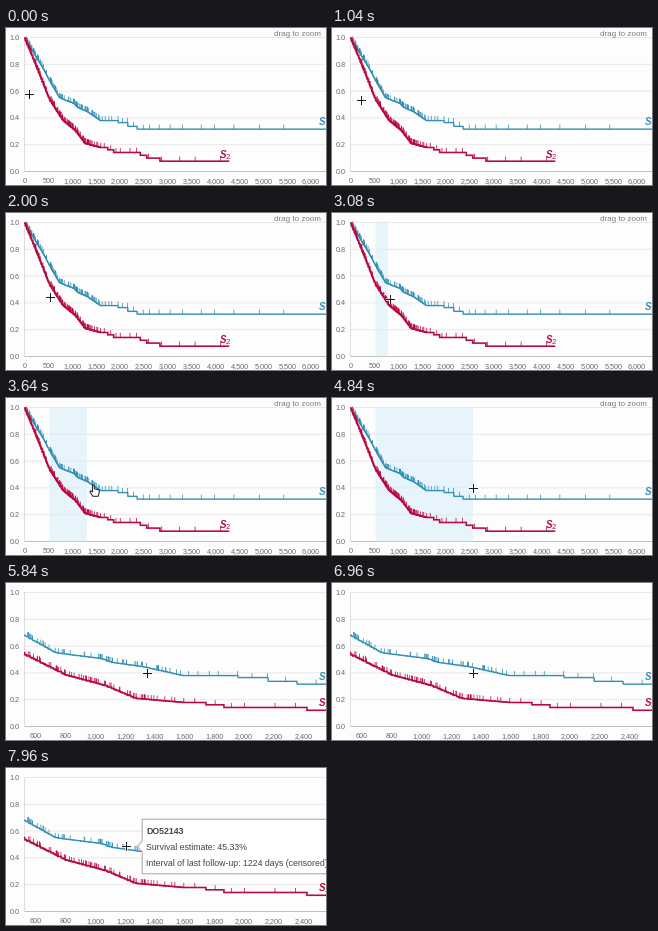
These frames come from a looping animation (320 by 157 pixels, 8 s). A matplotlib script:

```python
import numpy as np
import matplotlib.pyplot as plt
from matplotlib.animation import FuncAnimation
from matplotlib.patches import Polygon, Rectangle

W, H, DPI = 320, 157, 100
STEP, LOOP = 40, 8000
LEFT, TOP, BASE = 18.5, 9.5, 143.5
BLUE, RED, GREY = "#3390b4", "#b80a40", "#6a6a6a"
PT = 72 / DPI

ZOOM_AT, TIP_AT = 5840, 7640
DRAG_AT, DRAG_X = 2800, 43.5
HAND = (3540, 3760)

plt.rcParams.update({"font.family": "Liberation Sans", "path.snap": False})
fig = plt.figure(figsize=(W / DPI, H / DPI), dpi=DPI, facecolor="#fdfdfd")
ax = fig.add_axes([0, 0, 1, 1])
ax.set_xlim(0, W)
ax.set_ylim(H, 0)
ax.axis("off")

rng = np.random.default_rng(7)


def y_px(v):
    return BASE - np.asarray(v) * (BASE - TOP)


def label(x, y, s, size=7.3, color=GREY, **kw):
    return ax.text(x, y, s, fontsize=size * PT, color=color, va="baseline", **kw)


def survival(knots, plateaus, end):
    """Step curve: many small drops first, then a few long plateaus."""
    days = np.arange(0, knots[-1][0], 13.0)
    days[1:] += rng.uniform(-5, 5, len(days) - 1)
    drops = np.interp(days + 6, *zip(*knots))
    late, levels = zip(*plateaus)
    return (np.concatenate([days, late, [end]]),
            np.concatenate([drops, levels, levels[-1:]]))


def censoring(n, start, n_tail, last, power):
    """Days of the tick marks: dense at first, then ever wider apart."""
    u = np.linspace(0, 1, n_tail) ** power
    tail = start * (last / start) ** u * rng.uniform(.985, 1.015, n_tail)
    return np.concatenate([rng.uniform(20, start, n), tail])


s1 = survival([(0, 1), (200, .88), (400, .765), (523, .68), (735, .55),
               (1040, .507), (1105, .48), (1327, .445), (1590, .38)],
              [(1596, .38), (1960, .365), (2162, .337), (2357, .316)], 7000)
s2 = survival([(0, 1), (200, .83), (523, .54), (802, .385), (1071, .305),
               (1273, .21), (1610, .178)],
              [(1744, .162), (1865, .142), (2424, .121), (2560, .10),
               (2835, .077)], 4270)
c1 = censoring(85, 1430, 26, 5408, 2)
c2 = censoring(70, 1320, 26, 4130, 3)


def draw_curve(curve, censored, color, lw, x_px):
    x, y = curve
    clip = Rectangle((LEFT - .5, 0), W, H, transform=ax.transData)
    line, = ax.plot(x_px(x), y_px(y), drawstyle="steps-post", color=color,
                    lw=lw * PT, zorder=4, solid_joinstyle="miter")
    at = y_px(y[np.searchsorted(x, censored, "right") - 1])
    ticks = ax.vlines(x_px(censored), at - 4.6, at, color=color,
                      lw=.75 * PT, zorder=4)
    for a in (line, ticks):
        a.set_clip_path(clip)
    return [line, ticks]


def series_name(x, y, sub, color):
    return [label(x, y, "S", 9.8, color, style="italic", weight="bold", zorder=5),
            label(x + 6.1, y + 1.2, sub, 7.6, color, zorder=5)]


def make_view(start, scale, days, name2):
    def x_px(d):
        return LEFT + (np.asarray(d) - start) * scale

    parts = draw_curve(s1, c1, BLUE, 1.4, x_px)
    parts += draw_curve(s2, c2, RED, 1.6, x_px)
    parts += [label(x_px(d), 155.2, f"{d:,}", ha="center") for d in days]
    parts += series_name(312.7, 97, "1", BLUE)
    parts += series_name(*name2, "2", RED)
    return parts


# Shared axes
for k in range(6):
    gy = y_px(k / 5)
    ax.plot([LEFT, W], [gy, gy], color="#e9e9e9" if k else "#c0c0c0",
            lw=PT, zorder=1)
    label(14, gy + 2.6, f"{k / 5:.1f}", ha="right")
ax.plot([LEFT, LEFT], [TOP, BASE], color="#dedede", lw=PT, zorder=1)

full = make_view(0, .04777, range(0, 6001, 500), (213.7, 129.5))
full.append(label(268.3, 7.6, "drag to zoom", 8.05, "#7a7a7a"))
zoomed = make_view(523, .1486, range(600, 2401, 200), (312.7, 123))

band = Rectangle((DRAG_X, TOP), 0, BASE - TOP, fc="#d5eefb", alpha=.55,
                 ec="none", zorder=2)
ax.add_patch(band)

# Tooltip: soft shadow, bubble with a pointer, three lines of text
bubble = [(136.5, 51.5), (W + 20, 51.5), (W + 20, 105.5), (136.5, 105.5),
          (136.5, 84), (131.5, 78.5), (136.5, 73)]
tip = [ax.add_patch(Polygon(bubble, fc="white", ec=c, lw=w * PT, alpha=a,
                            joinstyle="round", zorder=7))
       for c, w, a in [("#888888", 3.2, .2), ("#bcbcbc", 1, 1)]]
rows = ["DO52143", "Survival estimate: 45.33%",
        "Interval of last follow-up: 1224 days (censored)"]
for k, row in enumerate(rows):
    tip.append(label(140.2, 65.6 + 16 * k, row, 8.8, "#444444", zorder=8,
                     weight="normal" if k else "bold"))

# Pointers
cross = [ax.plot([], [], color=c, lw=w * PT, zorder=9 + i,
                 solid_capstyle="butt")[0]
         for i, (c, w) in enumerate([("white", 2.4), ("#1a1a1a", 1)])]
ARMS = np.array([(-4.5, 0), (4.5, 0), (np.nan, np.nan), (0, -4.5), (0, 4.5)])
PALM = np.array([(-2, -5.5), (-.5, -5.5), (0, -1.6), (4.5, -.6), (4.8, 2),
                 (3.6, 5.8), (-1.6, 5.8), (-4.6, 1.4), (-4, .2), (-2, 1.4)])
hand = ax.add_patch(Polygon(PALM, closed=True, fc="white", ec="#222222",
                            lw=PT, joinstyle="round", zorder=10))

# Key points: time, then position
PATH = [(0, 23, 66), (520, 27, 68), (1480, 32, 77), (2000, 44, 84),
        (DRAG_AT, 44, 84), (3640, 88, 92), (4040, 135, 90), (4300, 141, 90),
        (7320, 141, 90), (7800, 120, 78)]
EDGE = [(DRAG_AT, DRAG_X), (3640, 81), (4040, 113.5), (4840, 141)]


def along(keys, t):
    times, *coords = zip(*keys)
    return np.array([np.interp(t, times, c) for c in coords])


def show(parts, on):
    for p in parts:
        p.set_visible(on)


def update(i):
    t = i * STEP
    is_zoomed = t >= ZOOM_AT
    show(full, not is_zoomed)
    show(zoomed, is_zoomed)
    show(tip, t >= TIP_AT)

    band.set_visible(DRAG_AT < t < ZOOM_AT)
    band.set_width(along(EDGE, t)[0] - DRAG_X)

    pos = np.floor(along(PATH, t)) + .5
    pointing = HAND[0] <= t < HAND[1]
    for line in cross:
        line.set_data(*(ARMS + pos).T)
    show(cross, not pointing)
    hand.set_xy(PALM + pos)
    hand.set_visible(pointing)
    return [band, hand, *cross, *tip, *full, *zoomed]


anim = FuncAnimation(fig, update, frames=LOOP // STEP, interval=STEP,
                     init_func=lambda: update(0), repeat=True, repeat_delay=0,
                     blit=False)
plt.show()
```
